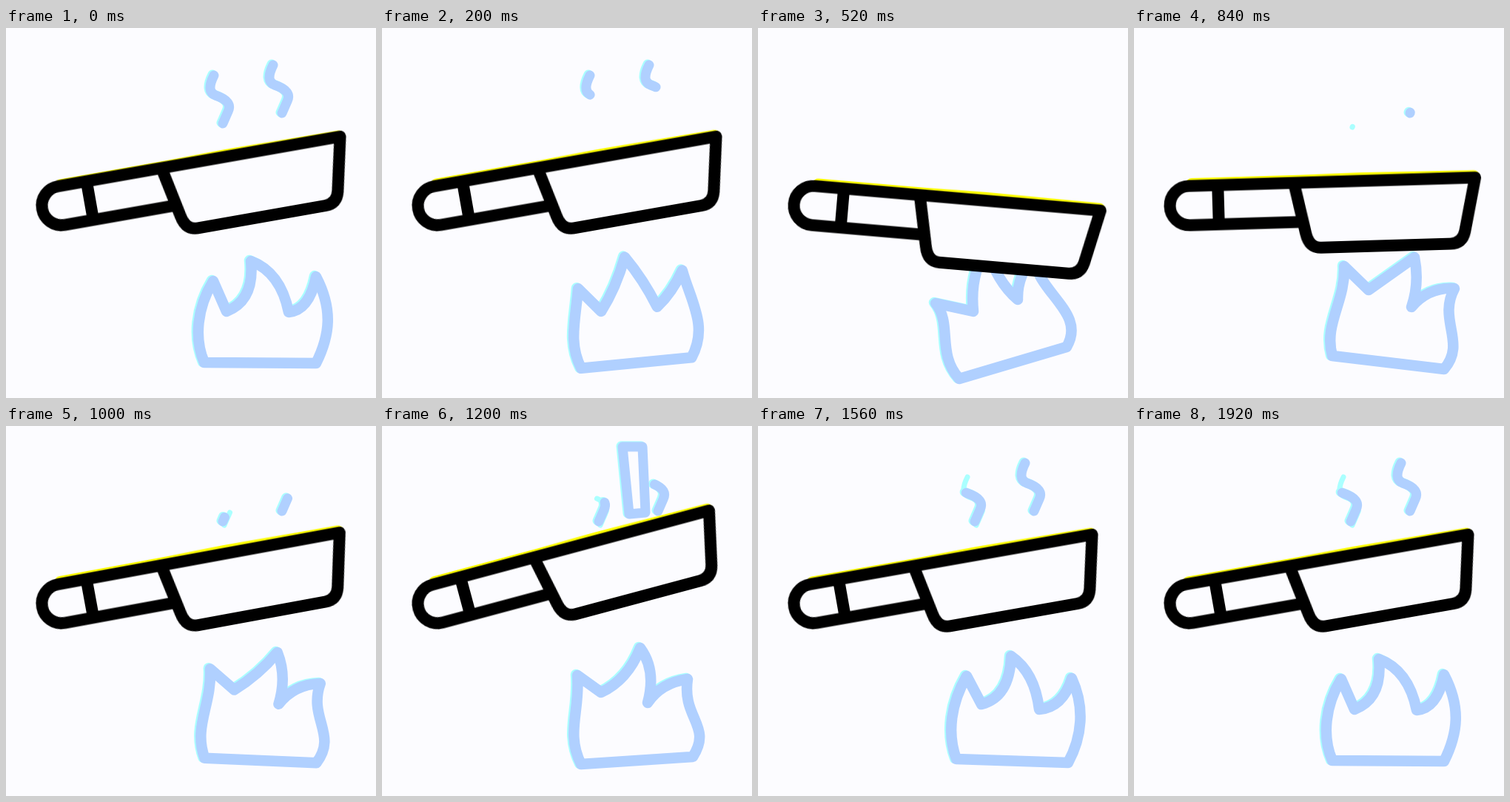
Recreate the animation shown at these times as an HTML page. Size 500 px wide and 500 px high, loop 2000 ms.

```html
<!DOCTYPE html>
<html lang="en">
<head>
<meta charset="utf-8">
<title>Pan on fire</title>
<style>
  html, body { margin: 0; width: 100%; height: 100%; overflow: hidden; background: #fcfcff; }
  svg { display: block; width: 100vw; height: 100vh; }

  path { fill: none; stroke-linecap: round; stroke-linejoin: round; }
  .blue { stroke: #b0d0ff; stroke-width: 13; }
  .cyan { stroke: #aff; stroke-width: 7; }
  .glow { filter: drop-shadow(-1.5px -1px 0 #aff); }
  .filled { fill: #fcfcff; }

  .flame, .pan, .edge, .trim, .column, .late, .early { animation: 2s infinite ease-in-out; }

  /* Flame: bottom left, left tip, dip, middle tip, dip, right tip, bottom right */
  .flame { stroke-width: 14.5; animation-name: flame; }
  @keyframes flame {
    0%, 96%, 100% {
      d: path("M268 452C254 420 258 378 280 342L298 383Q336 368 331 315Q371 330 382 384Q410 381 419 336C442 380 438 415 419 453Z");
    }
    0% { animation-timing-function: ease-in; }
    18% {
      d: path("M270 465C250 430 264 405 255 359L295 383Q303 340 326 306Q342 347 365 372Q380 342 397 322C402 365 443 395 418 440Z");
      animation-timing-function: ease-out;
    }
    26%, 28% {
      d: path("M272 474C241 440 263 400 240 372L291 383Q286 332 310 298Q322 342 351 367Q350 335 372 310C380 360 444 385 417 431Z");
    }
    42% {
      d: path("M268 443C256 400 286 370 284 322L317 354Q348 332 379 310Q386 345 375 377Q398 350 433 352C410 395 450 425 419 461Z");
    }
    60% {
      d: path("M269 457C248 415 268 385 264 337L296 360Q332 343 349 300Q371 330 359 374Q377 347 413 342C405 395 447 405 420 447Z");
    }
    78% {
      d: path("M268 450C255 415 261 374 282 338L302 376Q340 366 342 311Q374 333 380 383Q412 380 424 341C442 380 438 420 419 455Z");
    }
  }

  .pan { animation-name: tilt; transform-origin: 0 0; }
  @keyframes tilt {
    0%, 10.6% { transform: rotate(-10deg); }
    27%, 30% { transform: rotate(5deg); }
    60% { transform: rotate(-15deg); }
    76%, 100% { transform: rotate(-10deg); }
  }

  .edge { stroke: #ff0; stroke-width: 16; animation-name: edge; }
  @keyframes edge {
    0% { transform: translateY(1.5px); }
    18%, 60% { transform: none; }
    78%, 100% { transform: translateY(.5px); }
  }

  /* Steam leaves through its top end, then returns from the bottom */
  .trim { stroke-dasharray: 100 200; animation-name: trim; }
  @keyframes trim {
    0% { stroke-dashoffset: 0; }
    18% { stroke-dashoffset: 88; animation-timing-function: linear; }
    21% { stroke-dashoffset: 130; animation-timing-function: step-end; }
    40% { stroke-dashoffset: -130; animation-timing-function: step-end; }
    42% { stroke-dashoffset: -99; }
    60% { stroke-dashoffset: -45; }
    74%, 100% { stroke-dashoffset: 0; }
  }

  /* The left plume keeps only its lower part on its way back */
  .early { animation-name: early; }
  @keyframes early {
    0% { stroke-dashoffset: 0; }
    17% { stroke-dashoffset: 98; animation-timing-function: linear; }
    18% { stroke-dashoffset: 130; animation-timing-function: step-end; }
    43% { stroke-dashoffset: -130; animation-timing-function: step-end; }
    46% { stroke-dashoffset: -98; }
    60% { stroke-dashoffset: -66; }
    74%, 100% { stroke-dashoffset: -36; }
  }
  .late { animation-name: late; animation-timing-function: step-end; }
  @keyframes late {
    0% { opacity: 0; }
    16%, 100% { opacity: 1; }
  }

  .column { animation-name: column; transform-origin: 345px 122px; }
  @keyframes column {
    0%, 51% { transform: scaleY(0); visibility: hidden; }
    52% { visibility: visible; }
    57% { transform: scaleY(1.05); }
    60% { transform: none; }
    67% { transform: scaleY(0); visibility: visible; }
    68%, 100% { transform: scaleY(0); visibility: hidden; }
  }
</style>
</head>
<body>
<svg viewBox="0 0 500 500">
  <defs>
    <path id="plume" pathLength="100" d="M0 0Q-11 22 2 27Q26 35 19 49L12 65"/>
  </defs>

  <g class="glow">
    <path class="flame blue filled" d="M268 452C254 420 258 378 280 342L298 383Q336 368 331 315Q371 330 382 384Q410 381 419 336C442 380 438 415 419 453Z"/>
  </g>

  <g class="late"><use href="#plume" class="cyan trim" x="283" y="69"/></g>
  <g class="glow">
    <use href="#plume" class="blue early" stroke-dasharray="100 200" x="281" y="64"/>
    <use href="#plume" class="blue trim" x="361" y="50"/>
    <path class="column blue filled" d="M325 28H352L356 117L334 119Z"/>
  </g>

  <g transform="translate(75 240)">
    <g class="pan">
      <path class="edge" d="M4 -29H150L230 -30L385 -28.5"/>
      <g stroke="#000" stroke-width="16">
        <path class="filled" d="M149 26.5H0A26.5 26.5 0 0 1 0 -26.5H387L371 46Q367 62 351 62H176Q160 62 156 42L142 -26"/>
        <path d="M39 -25V25"/>
      </g>
    </g>
  </g>
</svg>
</body>
</html>
```
